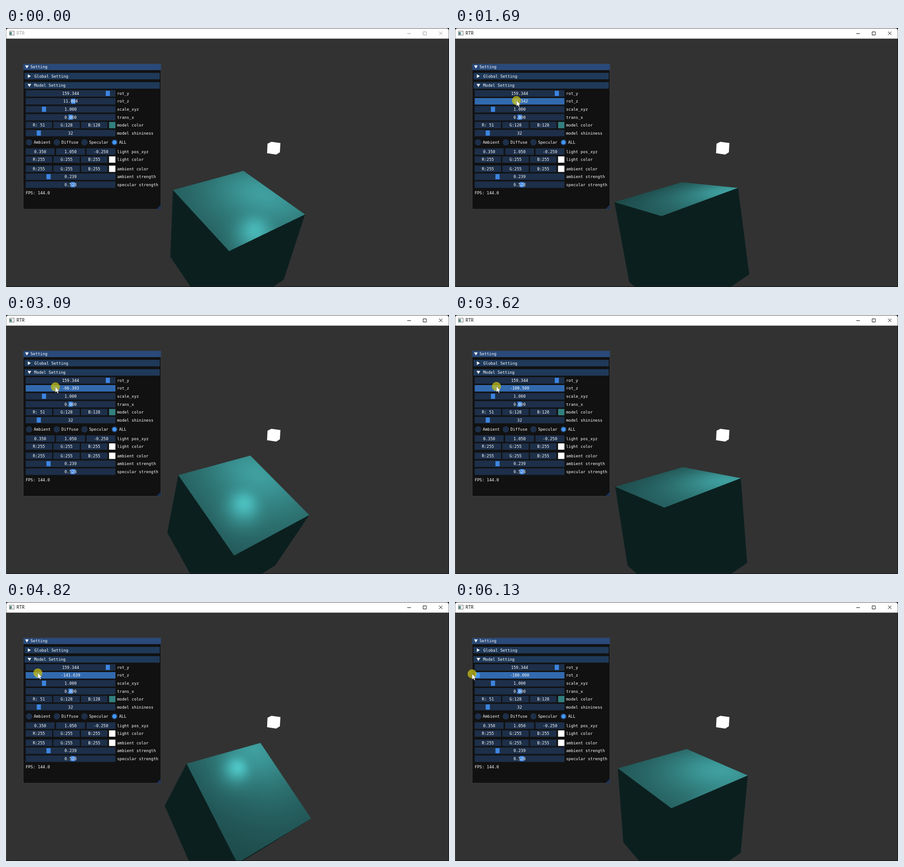
An HTML page with a canvas for the animation above (6.23 s loop, 977 px wide and 573 px high).

```html
<!DOCTYPE html>
<html lang="en">
<head>
<meta charset="utf-8">
<title>RTR</title>
<style>
html, body { margin: 0; width: 100%; height: 100%; overflow: hidden; background: #4a4a4a; }
canvas, svg { position: absolute; left: 0; top: 0; width: 977px; height: 573px; }
.ui text { font: 8.88px "DejaVu Sans Mono", monospace; fill: #fff; white-space: pre; }
.ui .mid { text-anchor: middle; }
#bar text { font: 10px "Open Sans", sans-serif; fill: currentColor; }
</style>
</head>
<body>
<canvas id="view" width="977" height="573"></canvas>
<svg class="ui" viewBox="0 0 977 573">
  <g id="bar">
    <path d="M.5 23.5V6Q.5 .8 6 .8H971Q976.5 .8 976.5 6V23.5Z" fill="#fff"/>
    <rect x="7.5" y="7" width="10.5" height="9" fill="#f4f4f4" stroke="#777"/>
    <rect x="8.5" y="9" width="4" height="6" fill="#3f7f78"/>
    <text x="23" y="15.3">RTR</text>
    <path d="M885 12.5h8M920 8.5h7v7h-7zM955 8l7.5 7.5M962.5 8l-7.5 7.5" fill="none" stroke="currentColor"/>
  </g>
  <g id="panel"></g>
  <circle id="press" r="10" fill="rgba(190,183,20,.78)"/>
  <path id="cursor" d="M0 0V12.6L2.8 9.9 4.9 14.2 6.9 13.2 5 9.2H8.9Z" fill="#fff" stroke="#222" stroke-width=".4"/>
</svg>
<script>
const $ = id => document.getElementById(id);
const DUR = 6230, RAD = Math.PI / 180;
const FRAME = '#1d2f49', HOVER = '#23456d', ACTIVE = '#326aaf', GRAB = '#3d85e0', MARK = '#4296fa';

// ---------- settings panel ----------
const rect = (x, y, w, h, fill, extra = '') =>
  `<rect x="${x}" y="${y}" width="${w}" height="${h}" fill="${fill}" ${extra}/>`;
const text = (x, y, s, extra = '') => `<text x="${x}" y="${y + 3.2}" ${extra}>${s}</text>`;
const mid = (x, y, s, id = '') => text(x, y, s, `class="mid" id="${id}"`);
const label = (y, s) => text(245, y, s);
const grab = (x, y, id = '') => rect(x - 4.6, y - 5.7, 9.2, 11.4, GRAB, `id="${id}"`);
const slider = (y, name, value, x, id = name) =>
  rect(43.4, y - 7.2, 198, 14.4, FRAME, `id="${id}Box"`) + grab(x, y, id + 'Grab') +
  mid(142.4, y, value, id + 'Text') + label(y, name);
const fields = (y, values, w, step) => values.map((v, i) =>
  rect(43.4 + i * step, y - 7.2, w, 14.4, FRAME) + mid(43.4 + i * step + w / 2, y, v)).join('');
const color = (y, name, values, fill) =>
  fields(y, values, 58.3, 61) + rect(227.3, y - 7, 14, 14, fill) + label(y, name);
const radio = (x, name, on) =>
  `<circle cx="${x}" cy="253" r="7" fill="${FRAME}"/>` +
  (on ? `<circle cx="${x}" cy="253" r="4.8" fill="${MARK}"/>` : '') + text(x + 10.2, 253, name);
const open = (x, y) => `<path d="M${x - 4} ${y - 3.2}h8l-4 6.8z" fill="#fff"/>`;
const shut = (x, y) => `<path d="M${x - 3} ${y - 4}v8l6.6-4z" fill="#fff"/>`;
const white = ['R:255', 'G:255', 'B:255'];

$('panel').innerHTML =
  rect(38, 79.3, 303.7, 321.6, '#111', 'stroke="#494952" stroke-width=".8"') +
  rect(38.3, 79.6, 303.2, 13.6, '#294a7a') + open(46, 86) + text(54, 86, 'Setting') +
  rect(41, 99.2, 298, 14.4, '#1f3959') + shut(51.2, 106.4) + text(62.5, 106.6, 'Global Setting') +
  rect(41, 119.8, 298, 14.4, '#1f3959') + open(51.6, 127) + text(62, 127.2, 'Model Setting') +
  slider(144.7, 'rot_y', '159.344', 224.6) +
  slider(162.2, 'rot_z', '', 148.6, 'rotZ') +
  slider(179.8, 'scale_xyz', '1.000', 83.8) +
  slider(197.4, 'trans_x', '0.000', 142.4) +
  color(214.8, 'model color', ['R: 51', 'G:128', 'B:128'], '#338080') +
  slider(232.4, 'model shininess', '32', 72.3) +
  radio(51, 'Ambient') + radio(112, 'Diffuse') + radio(173, 'Specular') + radio(239.3, 'ALL', true) +
  fields(273.4, ['0.350', '1.050', '-0.250'], 63.8, 67.1) + label(273.4, 'light pos_xyz') +
  color(291, 'light color', white, '#fff') +
  color(311.5, 'ambient color', white, '#fff') +
  slider(329, 'ambient strength', '0.239', 93.8) +
  slider(346.6, 'specular strength', '0.528', 147.6) +
  text(43.4, 365, '', 'id="fps"') +
  '<path d="M341.5 391v9.7h-9.7z" fill="#1d3157"/>';

// ---------- scene ----------
const ctx = $('view').getContext('2d');
const buf = document.createElement('canvas'), bctx = buf.getContext('2d', { willReadFrequently: true });
const SS = 2, FOCAL = 589, CX = 488.5, CY = 298;
const TILT_S = Math.sin(18 * RAD), TILT_C = Math.cos(18 * RAD);
const dot = (a, b) => a[0] * b[0] + a[1] * b[1] + a[2] * b[2];

// Turn world space so that +z points away from the camera.
const yawS = Math.sin(-31.65 * RAD), yawC = Math.cos(-31.65 * RAD);
const turn = ([x, y, z]) => [x * yawC + z * yawS, y, x * yawS - z * yawC];
const eye = [-0.047, 1.756, -2.632], light = turn([0.35, 1.05, -0.25]);

function project(p) {
  const h = eye[1] - p[1], z = p[2] - eye[2], d = z * TILT_C + h * TILT_S;
  return [CX + FOCAL * (p[0] - eye[0]) / d, CY + FOCAL * (h * TILT_C - z * TILT_S) / d];
}

function rotate([x, y, z], ry, rz) {
  const a = x * Math.cos(rz) - y * Math.sin(rz), b = x * Math.sin(rz) + y * Math.cos(rz);
  return turn([a * Math.cos(ry) + z * Math.sin(ry), b, z * Math.cos(ry) - a * Math.sin(ry)]);
}

// Faces of a box that look towards the camera.
function visibleFaces(half, center, ry, rz) {
  const faces = [];
  for (let k = 0; k < 3; k++) for (const sign of [-1, 1]) {
    const unit = [0, 0, 0];
    unit[k] = sign;
    const n = rotate(unit, ry, rz);
    if (dot(n, eye) - dot(n, center) <= half) continue;
    const ring = [[-1, -1], [1, -1], [1, 1], [-1, 1]].map(([a, b]) => {
      const p = [0, 0, 0];
      p[k] = sign * half;
      p[(k + 1) % 3] = a * half;
      p[(k + 2) % 3] = b * half;
      return project(rotate(p, ry, rz).map((v, i) => v + center[i]));
    });
    faces.push({ n, ring: sign < 0 ? ring.reverse() : ring });
  }
  return faces;
}

function outline(faces) {
  ctx.beginPath();
  for (const { ring } of faces) {
    ring.forEach(([x, y], i) => i ? ctx.lineTo(x, y) : ctx.moveTo(x, y));
    ctx.closePath();
  }
}

// Phong intensity at point p with normal n, seen along dir.
function shade(p, n, dir) {
  const l = light.map((v, i) => v - p[i]), nl = dot(n, l) / Math.hypot(...l);
  if (nl <= 0) return 0.239;
  const ll = Math.sqrt(dot(l, l));
  const vr = (dot(dir, l) / ll - 2 * nl * dot(n, dir)) / Math.sqrt(dot(dir, dir));
  return 0.239 + nl + (vr > 0.8 ? 0.528 * vr ** 32 : 0);
}

function drawCube(angle) {
  const faces = visibleFaces(0.5, [0, 0, 0], 159.344 * RAD, angle * RAD);
  const pts = faces.flatMap(f => f.ring);
  const xs = pts.map(p => p[0]), ys = pts.map(p => p[1]);
  const x0 = Math.floor(Math.min(...xs)) - 1, y0 = Math.floor(Math.min(...ys)) - 1;
  const w = Math.ceil(Math.max(...xs)) + 1 - x0, h = Math.min(573, Math.ceil(Math.max(...ys)) + 1) - y0;
  buf.width = w * SS;
  buf.height = h * SS;
  const img = bctx.createImageData(buf.width, buf.height), px = img.data;
  const gaps = faces.map(f => 0.5 - dot(f.n, eye));
  for (let j = 0, o = 0; j < buf.height; j++) {
    const v = (y0 + (j + 0.5) / SS - CY) / FOCAL;
    for (let i = 0; i < buf.width; i++, o += 4) {
      const dir = [(x0 + (i + 0.5) / SS - CX) / FOCAL, -TILT_S - v * TILT_C, TILT_C - v * TILT_S];
      let t = 0, n = null;
      for (let k = 0; k < faces.length; k++) {
        const nd = dot(faces[k].n, dir), hit = gaps[k] / nd;
        if (nd < 0 && hit > t) { t = hit; n = faces[k].n; }
      }
      const s = n ? shade([eye[0] + t * dir[0], eye[1] + t * dir[1], eye[2] + t * dir[2]], n, dir) : 0.239;
      px[o] = 51 * s;
      px[o + 1] = px[o + 2] = 128 * s;
      px[o + 3] = 255;
    }
  }
  bctx.putImageData(img, 0, 0);
  ctx.save();
  outline(faces);
  ctx.clip();
  ctx.drawImage(buf, x0, y0, w, h);
  ctx.restore();
}

function drawScene(angle) {
  ctx.fillStyle = '#111';
  ctx.fillRect(0, 0, 977, 573);
  ctx.fillStyle = '#4a4a4a';
  ctx.fillRect(0, 0, 1, 573);
  ctx.save();
  ctx.beginPath();
  ctx.rect(1, 23, 975, 549);
  ctx.clip();
  ctx.fillStyle = '#323232';
  ctx.fillRect(1, 23, 975, 549);
  drawCube(angle);
  outline(visibleFaces(0.05, light, 0, 0));
  ctx.fillStyle = '#fff';
  ctx.fill();
  ctx.restore();
}

// ---------- timeline ----------
const GRIP = 990;
const DRAG = [[990, 10.329], [2290, -35.489], [2990, -58.6], [3090, -66.393], [3620, -100.5], [4120, -113.606],
  [4320, -123.3], [4820, -141.639], [5020, -145.5], [5730, -178], [6130, -205]];
const HAND_Y = [[990, 161], [2290, 160], [3090, 159], [4120, 157], [4820, 157], [6130, 159]];

function sample(keys, t) {
  const i = keys.findIndex(k => k[0] >= t);
  if (i < 0) return keys[keys.length - 1][1];
  if (i === 0) return keys[0][1];
  const [t0, a] = keys[i - 1], [t1, b] = keys[i];
  return a + (b - a) * (t - t0) / (t1 - t0);
}

function tick(t) {
  const drift = t < 450 ? 0 : t < 3500 ? -10 : t < 5700 ? 20 : 30;
  return Math.max(0, Math.floor((t - drift) / 100) * 100 + drift);
}

function pose(t) {
  const held = t >= GRIP;
  const drag = sample(DRAG, t), angle = held ? Math.max(-180, drag) : 11.804;
  const ease = (1 - Math.min(1, Math.max(0, (t - 100) / 590))) ** 2;
  const x = held ? 143 + 0.514 * drag : 148.6 + 504 * ease;
  const y = held ? sample(HAND_Y, t) : 161 + 307 * ease;
  const over = t >= 100 && x < 241 && y < 169.4;

  $('bar').style.color = held ? '#000' : '#999';
  $('rotZBox').setAttribute('fill', held ? ACTIVE : over ? HOVER : FRAME);
  $('rotZGrab').setAttribute('fill', held ? MARK : GRAB);
  $('rotZGrab').setAttribute('x', 137.8 + angle * 0.514);
  $('rotZText').textContent = angle.toFixed(3);
  $('fps').textContent = 'FPS: ' + (held && t < 1590 ? '143.8' : '144.0');
  for (const [id, shown] of [['press', held], ['cursor', t >= 100]]) {
    $(id).setAttribute('transform', `translate(${x} ${y})`);
    $(id).setAttribute('visibility', shown ? 'visible' : 'hidden');
  }
  return angle;
}

const start = performance.now();
let lastTick = -1, lastAngle;
function loop() {
  const t = tick((performance.now() - start) % DUR);
  if (t !== lastTick) {
    lastTick = t;
    const angle = pose(t);
    if (angle !== lastAngle) drawScene(lastAngle = angle);
  }
  requestAnimationFrame(loop);
}
loop();
</script>
</body>
</html>
```
